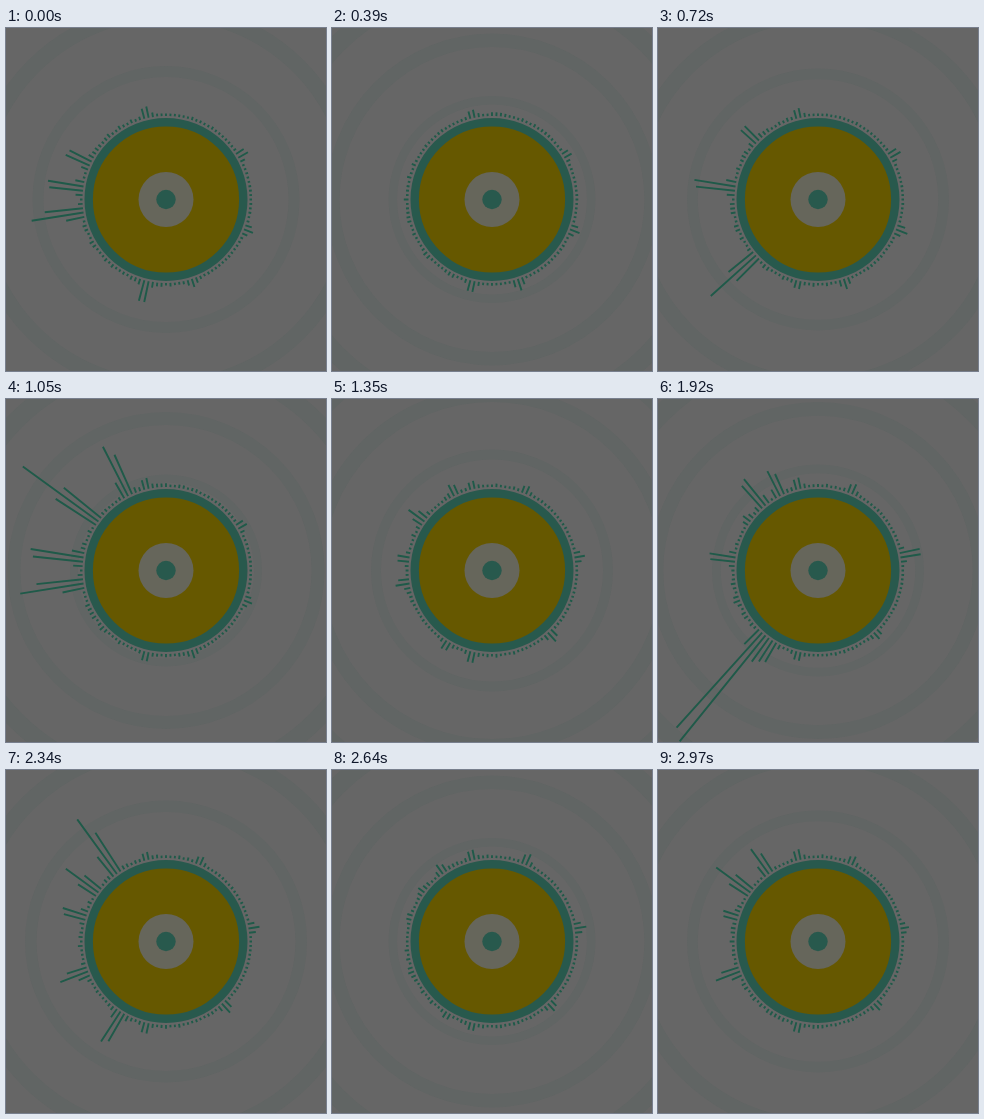
An HTML page that plays this animation: 320 px wide and 343 px high, repeating every 3 s.

```html
<!DOCTYPE html>
<html lang="en">
<head>
<meta charset="utf-8">
<title>Radial spectrum</title>
<style>
  html, body { margin: 0; width: 100%; height: 100%; overflow: hidden; background: #666; }
  svg { display: block; width: 100%; height: 100%; }
</style>
</head>
<body>
<svg viewBox="0 0 320 343">
  <g transform="translate(160 171.5)">
    <g id="waves" fill="none" stroke="#285a4d" stroke-opacity=".07"></g>
    <path id="bars" fill="none" stroke="#1f5a49" stroke-width="1.9"/>
    <circle r="77.3" fill="#665800" stroke="#28594d" stroke-width="8.4"/>
    <circle r="27.5" fill="#66665b"/>
    <circle r="9.7" fill="#28594d"/>
  </g>
</svg>
<script>
const LOOP = 3000, STEP = 30, BARS = 120;
const WAVE_GAP = 60, WAVE_SPEED = 0.08;
const BASE = 83.5, REST = 86;
const ATTACK = 320, FALL = 420;

// Positions count bars clockwise from the left.
const LOW = 2.55, MID = 12, HIGH = 21.3, BASS = 117.25, SUB = 113.2, DEEP = 100.6;

// Each beat strikes a few notes: [position, height].
const beats = [
  { time: 0, notes: [[BASS, 52], [LOW, 38], [8.45, 27], [94.5, 22]] },
  { time: 690, notes: [[106, 59], [LOW, 45], [14.5, 21]] },
  { time: 1050, notes: [[MID, 91], [BASS, 64], [LOW, 58], [HIGH, 56]] },
  { time: 1620, notes: [[DEEP, 132], [94.5, 39], [HIGH, 36], [MID, 35], [SUB, 24]] },
  { time: 1920, notes: [[103.45, 152], [16.6, 35], [LOW, 27], [HIGH, 27], [56.5, 21]] },
  { time: 2320, notes: [[18.2, 67], [MID, 38], [DEEP, 37], [SUB, 28], [5.6, 25]] },
  { time: 2950, notes: [[MID, 40], [18.2, 29], [SUB, 24], [5.6, 15]] },
];

// Faint overtones: the chord changes halfway through.
const chords = [[25.6, 49.7, 66.9, 84, 94.5], [25.6, 37.7, 57, 75.8, 94.5]];
const CHORD_CHANGE = 1350;

function seeded(seed) {
  return () => (seed = seed * 16807 % 2147483647) / 2147483647;
}
const random = seeded(77);
const shimmer = Array.from({ length: BARS }, () => ({
  phase: random() * 2 * Math.PI,
  speed: 0.004 + random() * 0.006,
}));

const hump = x => Math.abs(x) < 1 ? Math.cos(Math.PI * x / 2) ** 2 : 0;
const lobe = d => hump(d / 2); // main lobe of a Hann window, four bars wide
const envelope = dt => hump(dt / (dt < 0 ? ATTACK : FALL));

function floorHeight(i, t) {
  const leftness = (1 + Math.cos(2 * Math.PI * i / BARS)) / 2;
  const { phase, speed } = shimmer[i];
  return (0.3 + 2 * leftness) * Math.max(0, Math.sin(phase + t * speed));
}

function spectrum(t) {
  const heights = shimmer.map((_, i) => floorHeight(i, t));
  const strike = (pos, height) => {
    for (let k = Math.ceil(pos - 2); k < pos + 2; k++) {
      const i = k % BARS;
      heights[i] = Math.max(heights[i], height * lobe(k - pos));
    }
  };
  for (const { time, notes } of beats) {
    const level = envelope(t - time);
    if (level) notes.forEach(([pos, height]) => strike(pos, height * level));
  }
  const chord = chords[t < CHORD_CHANGE ? 0 : 1];
  chord.forEach((pos, i) => strike(pos, 8 + 2 * Math.cos(t / 150 + i)));
  return heights;
}

function barPath(heights) {
  return heights.map((h, i) => {
    const a = Math.PI + i * 2 * Math.PI / BARS;
    const at = r => (r * Math.cos(a)).toFixed(2) + " " + (r * Math.sin(a)).toFixed(2);
    return "M" + at(BASE) + "L" + at(REST + h);
  }).join("");
}

const bars = document.getElementById("bars");
const waves = Array.from({ length: 4 }, () => {
  const circle = document.createElementNS("http://www.w3.org/2000/svg", "circle");
  return document.getElementById("waves").appendChild(circle);
});

function draw(t) {
  waves.forEach((wave, i) => {
    const r = 60 + (8 + t * WAVE_SPEED) % WAVE_GAP + i * WAVE_GAP;
    wave.setAttribute("r", r);
    wave.setAttribute("stroke-width", r * 0.085);
  });
  bars.setAttribute("d", barPath(spectrum(t)));
}

const start = performance.now();
function tick() {
  const t = (performance.now() - start) % LOOP;
  draw(Math.floor(t / STEP) * STEP);
  requestAnimationFrame(tick);
}
tick();
</script>
</body>
</html>
```
